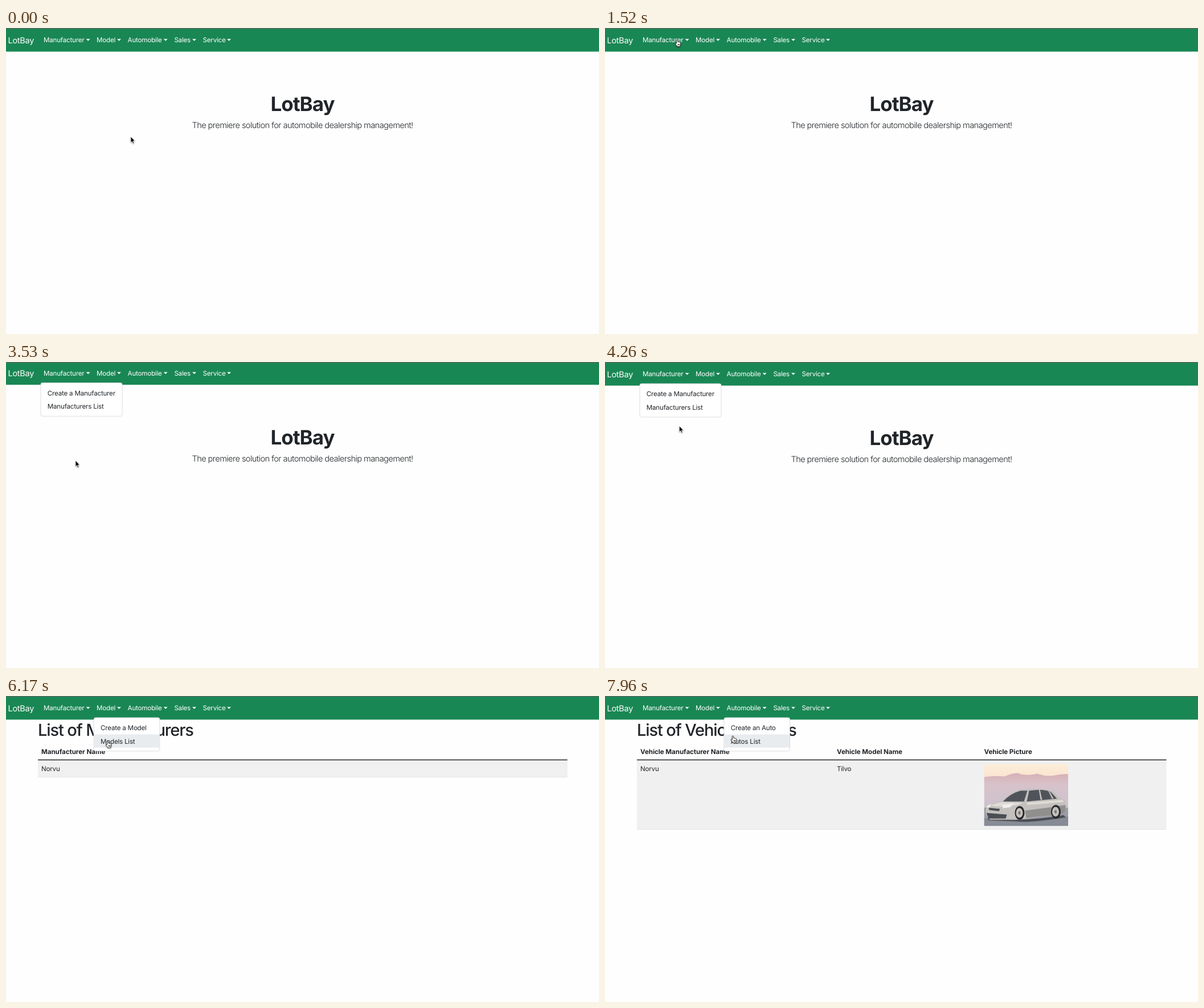
Recreate the animation shown at these times as an HTML page. Size 1041 by 538 pixels, loop 7.99 s.

```html
<!DOCTYPE html>
<html lang="en">
<head>
<meta charset="utf-8">
<title>Dealership demo</title>
<style>
  html, body { margin: 0; width: 100%; height: 100%; overflow: hidden; background: #fefefe; }
  svg { display: block; }
  text { font: 11.6px Inter, "Open Sans", sans-serif; letter-spacing: -.018em; fill: #212529; text-rendering: geometricPrecision; white-space: pre; }
  .nav text { fill: #fff; }
  .nav .brand { font-size: 14.5px; }
  .title { font-size: 34.8px; font-weight: 700; letter-spacing: -.025em; text-anchor: middle; }
  .lead { font-size: 14.5px; font-weight: 350; letter-spacing: -.036em; text-anchor: middle; }
  .h1 { font-size: 29px; font-weight: 500; letter-spacing: -.039em; }
  .th { font-weight: 700; letter-spacing: -.005em; }
  #cursor { filter: drop-shadow(0 1px 1px rgba(0,0,0,.35)); }
</style>
</head>
<body>
<svg id="stage" width="1041" height="538" viewBox="0 0 1041 538"></svg>
<script>
const LOOP = 7990;
const text = (x, y, s, cls = '') => `<text x="${x}" y="${y}" class="${cls}">${s}</text>`;
const rect = (x, y, w, h, fill, more = '') => `<rect x="${x}" y="${y}" width="${w}" height="${h}" fill="${fill}" ${more}/>`;
const path = (d, fill, more = '') => `<path d="${d}" fill="${fill}" ${more}/>`;

const links = [[66, 'Manufacturer', 140.6], [159, 'Model', 195], [213.6, 'Automobile', 276.6], [295.4, 'Sales', 327], [345.6, 'Service', 388]];
const nav = '<g class="nav">' + rect(0, -4, 1041, 45.5, '#198754') + text(3.5, 26.5, 'LotBay', 'brand') +
  links.map(([x, s, c]) => text(x, 25.4, s) + path(`M${c} 19.3h7l-3.5 3.5z`, '#fff')).join('') + '</g>';

const table = (title, heads, cells, h) => text(56, 70.2, title, 'h1') +
  rect(56, 113, 929.5, h, '#f0f0f0') + rect(56, 111.6, 929.5, 1.5, '#212529') +
  rect(56, 112.5 + h, 929.5, .8, '#dee2e6') +
  heads.map(([x, s]) => text(x, 101.6, s, 'th')).join('') +
  cells.map(([x, s]) => text(x, 132.2, s)).join('');

const oval = (x, y, rx, ry, fill) => `<ellipse cx="${x}" cy="${y}" rx="${rx}" ry="${ry}" fill="${fill}"/>`;
const wheel = (x, y) => oval(x, y, 8.5, 12, '#29292c') + oval(x - .5, y, 6, 8.5, '#c4c1bd') + oval(x - .5, y, 2, 3, '#77767a');
const photo = `<svg x="665.5" y="119.5" width="147.5" height="109" viewBox="0 0 147.5 109">
  <linearGradient id="sky" x2="0" y2="1"><stop offset="0" stop-color="#fdeed8"/><stop offset="1" stop-color="#f6dccb"/></linearGradient>
  <linearGradient id="hill" x2="0" y2="1"><stop offset="0" stop-color="#d6b0b4"/><stop offset=".3" stop-color="#d8c2ca"/><stop offset="1" stop-color="#c9c3cd"/></linearGradient>` +
  rect(0, 0, 148, 40, 'url(#sky)') +
  path('M0 23Q18 20 36 22Q48 16 60 16Q72 22 94 17Q108 23 124 20T148 18V84H0z', 'url(#hill)') +
  rect(0, 77, 148, 32, '#9a9ca6') + path('M0 95Q70 106 148 92V109H0z', '#868b95') +
  path('M6 95Q60 103 140 90L143 94Q80 104 56 101L8 99z', '#4b4d54') +
  path('M3 88Q2 78 6 74Q16 68 31 66Q44 52 62 45Q92 41 118 47Q126 51 132 59L140 62Q144 70 143 82L138 88L112 91L74 96L56 98L10 98z', '#c3c0bd') +
  path('M72 82L118 76L143 72L143 82L138 88L74 95z', '#918e8e') +
  path('M33 66Q46 52 64 47H76L70 66z M79 47Q104 43 117 49L128 61L75 66z', '#50545a') +
  path('M96 45h2l4 18h-3z M112 46h2l8 15h-3z', '#c3c0bd') +
  path('M9 74Q24 67 34 67L68 68L60 72Q40 75 30 75z M74 68L138 63L140 67L76 72z', '#dedbd6') +
  path('M4 86L40 89L38 96L8 96z M8 77L28 79L26 83L9 81z', '#4c4e55') +
  path('M32 72L52 69L46 76L33 78z M5 74L12 70L10 76L5 77z', '#efeeeb') +
  wheel(62.5, 86) + wheel(126, 84) + '</svg>';

const menu = (id, x, w, items) => `<g id="menu${id}">` +
  rect(x, 38, w, 58.8, '#fff', 'rx="3" stroke="#d4d4d4" stroke-width=".8"') +
  rect(x + .5, 67.5, w - 1, 23.2, '#e9ecef', 'class="hover"') +
  items.map((s, i) => text(x + 11.8, 60.2 + 23.3 * i, s)).join('') + '</g>';

const stage = document.getElementById('stage');
stage.innerHTML = '<g id="page">' + nav +
  '<g id="view0">' + text(520.5, 146.3, 'LotBay', 'title') +
  text(520.5, 176, 'The premiere solution for automobile dealership management!', 'lead') + '</g>' +
  '<g id="view1">' + table('List of Manufacturers', [[62, 'Manufacturer Name']], [[62, 'Norvu']], 29.5) + '</g>' +
  '<g id="view2">' + table('List of Vehicle Models',
    [[62, 'Vehicle Manufacturer Name'], [407, 'Vehicle Model Name'], [665.5, 'Vehicle Picture']],
    [[62, 'Norvu'], [407, 'Tilvo']], 121.5) + photo + '</g>' +
  menu(0, 61, 143, ['Create a Manufacturer', 'Manufacturers List']) +
  menu(1, 154.2, 115.6, ['Create a Model', 'Models List']) +
  menu(2, 208.9, 115.6, ['Create an Auto', 'Autos List']) + '</g>' +
  rect(0, 0, 1041, 1.4, '#566b60') +
  '<g id="cursor">' +
  path('M0 0V10.6L2.4 8.4L4.1 12.2L5.8 11.4L4.2 7.8H7.4z', '#000', 'id="arrow" stroke="#fff" stroke-width=".8"') +
  path('M-1.6 7V1.2Q-1.5 .2 -.5 .2Q.6 .2 .7 1.2V4Q2 3.4 2.5 4.4Q3.8 3.9 4.2 5Q5.7 4.7 5.8 6V8.5Q5.7 10.2 4.7 11.2V12.2H-.6V11.3Q-2.2 9.8 -3.8 7.2Q-4 5.9 -2.8 6z M1 7.6V10 M2.5 7.6V10 M4 7.6V10',
    '#fff', 'id="hand" stroke="#000" stroke-width=".8" stroke-linejoin="round"') + '</g>';

const el = id => document.getElementById(id);
const show = (node, on) => node.setAttribute('visibility', on ? 'inherit' : 'hidden');
const smooth = u => u * u * (3 - 2 * u);

// time, x, y of the pointer tip
const track = [[0, 219, 191], [180, 219, 191], [340, 213, 201], [970, 99, 98], [1000, 99, 98], [1520, 127, 20.5],
  [2380, 127, 20.5], [3080, 122, 173.5], [4020, 122, 173], [4400, 134, 86], [4740, 134, 86], [5120, 158, 32],
  [5360, 171, 25.5], [5800, 171, 25.5], [6170, 179, 79], [6290, 179, 79], [6550, 183, 62], [6610, 183, 62],
  [6810, 211, 29.5], [6980, 221, 22.5], [7340, 221, 22.5], [7960, 225, 70], [LOOP, 225, 70]];
// menu: opens, closes, left, right
const menus = [[2090, 4500, 61, 204], [5620, 6400, 154, 270], [7160, LOOP, 209, 325]];

function pointer(t) {
  const i = Math.max(1, track.findIndex(k => k[0] > t));
  const [t0, x0, y0] = track[i - 1], [t1, x1, y1] = track[i];
  const u = smooth((t - t0) / (t1 - t0));
  return [x0 + (x1 - x0) * u, y0 + (y1 - y0) * u];
}

function scroll(t) {
  const ramp = (a, b) => smooth(Math.min(1, Math.max(0, (t - a) / (b - a))));
  return 1.5 * (ramp(3350, 3480) - ramp(3680, 3820));
}

function draw(now) {
  const t = now % LOOP, [x, y] = pointer(t);
  const view = t < 4500 ? 0 : t < 6400 ? 1 : 2;
  let hand = y < 38;
  for (let i = 0; i < 3; i++) {
    const [a, b, left, right] = menus[i], node = el('menu' + i), bar = node.querySelector('.hover');
    const open = t >= a && t < b, row = Math.floor((y - 44.2) / 23.3);
    const over = open && x > left && x < right && (row === 0 || row === 1);
    hand ||= over;
    show(el('view' + i), i === view);
    show(node, open);
    show(bar, open && over);
    bar.setAttribute('y', 44.2 + 23.3 * row);
  }
  show(el('arrow'), !hand);
  show(el('hand'), hand);
  el('page').setAttribute('transform', `translate(0 ${-scroll(t)})`);
  el('cursor').setAttribute('transform', `translate(${x} ${y})`);
  requestAnimationFrame(draw);
}
requestAnimationFrame(draw);
</script>
</body>
</html>
```
